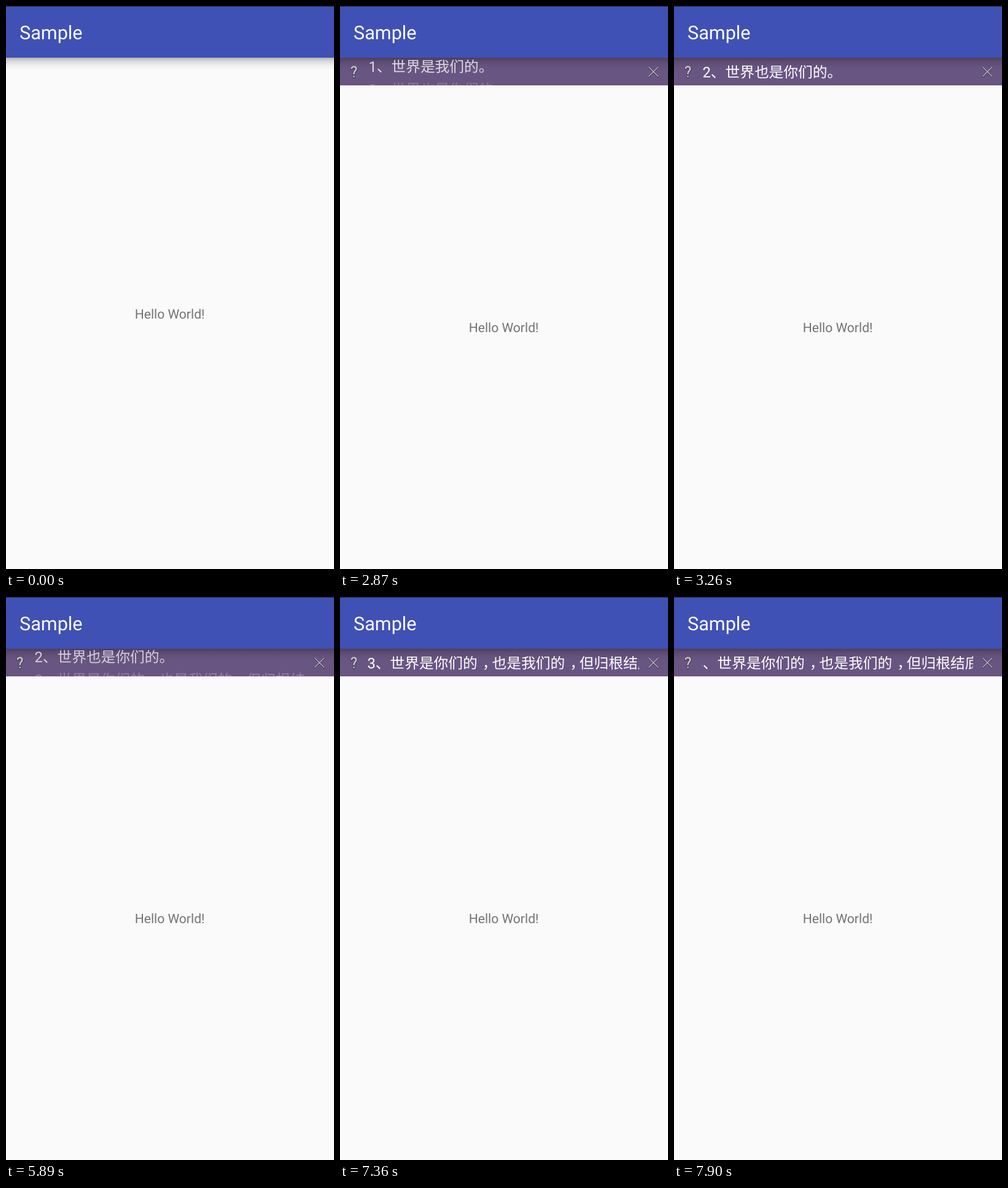
Animation of 534 by 915 pixels, one loop 8 s. Source, as an HTML page:

```html
<!DOCTYPE html>
<html lang="zh-CN">
<head>
<meta charset="utf-8">
<title>Sample</title>
<style>
  html, body { margin: 0; width: 100%; height: 100%; overflow: hidden; background: #fafafa; }
  svg { display: block; width: 100vw; height: 100vh; }
  text { font-family: Roboto, "Noto Sans CJK SC", "Noto Sans CJK", sans-serif; text-rendering: geometricPrecision; white-space: pre; }
  .title { font-size: 30.6px; fill: #fff; }
  .hello { font-size: 21.1px; fill: #737373; text-anchor: middle; }
  .line { font-size: 23.73px; fill: #fff; }
  .icon { fill: none; stroke-linecap: round; stroke-linejoin: round; }
</style>
</head>
<body>
<svg viewBox="0 0 534 915" preserveAspectRatio="none">
  <defs>
    <linearGradient id="shade" x1="0" y1="0" x2="0" y2="1">
      <stop offset="0" stop-color="#000" stop-opacity=".27"/>
      <stop offset=".3" stop-color="#000" stop-opacity=".13"/>
      <stop offset=".65" stop-color="#000" stop-opacity=".04"/>
      <stop offset="1" stop-color="#000" stop-opacity="0"/>
    </linearGradient>
    <clipPath id="view"><rect x="45.3" y="84" width="441.7" height="45"/></clipPath>
    <path id="ask" d="M18.9 101.2C19.6 97.7 26.3 97.6 26.3 101.9C26.3 105.6 22.6 105.6 22.6 110M22.6 114.6V114.7"/>
    <path id="cross" d="M502.8 99.3L517.8 114.3M517.8 99.3L502.8 114.3"/>
  </defs>

  <rect width="534" height="915" fill="#fafafa"/>
  <text id="hello" class="hello" x="266.6" y="508">Hello World!</text>

  <g id="bar">
    <rect y="84" width="534" height="45" fill="#695582"/>
    <g class="icon">
      <use href="#ask" y=".5" stroke="#40364f" stroke-width="4.6"/>
      <use href="#ask" stroke="#c6c1ca" stroke-width="2.7"/>
      <use href="#cross" y=".3" stroke="#463a58" stroke-width="3"/>
      <use href="#cross" stroke="#bdb6c4" stroke-width="1.4"/>
    </g>
  </g>
  <rect y="84" width="534" height="20" fill="url(#shade)"/>
  <g id="lines" clip-path="url(#view)">
    <text class="line" x="46.4" y="115.5">1、世界是我们的。</text>
    <text class="line" x="46.4" y="115.5">2、世界也是你们的。</text>
    <text class="line" x="46.4" y="115.5">3、世界是你们的<tspan dx="8">，</tspan><tspan dx="-8">也</tspan>是我们的<tspan dx="8">，</tspan><tspan dx="-8">但</tspan>归根结底是你们的。</text>
  </g>

  <rect width="534" height="84" fill="#4051b5"/>
  <rect width="534" height="1" fill="#1f2440"/>
  <text class="title" x="22" y="54.3">Sample</text>
</svg>
<script>
  const LOOP = 8000, OPEN = 500, ROW = 37;
  // time in ms, current line, sideways scroll in px
  const steps = [
    [0, 0, 0],
    [2870, .22, 0], [2990, .46, 0], [3140, .76, 0], [3260, 1, 0],
    [5890, 1.27, 0], [6040, 1.57, 0], [6190, 1.87, 0], [6340, 2, 0],
    [7360, 2, 2], [7480, 2, 4.5], [7630, 2, 7.5], [7780, 2, 10.5], [7900, 2, 13]
  ];
  const byId = id => document.getElementById(id);
  const hello = byId('hello'), bar = byId('bar'), group = byId('lines');
  const lines = [...group.children];

  function draw(t) {
    const open = t >= OPEN;
    const [, pos, scroll] = steps.filter(s => s[0] <= t).pop();
    hello.setAttribute('y', open ? 530.3 : 508);
    bar.style.display = group.style.display = open ? '' : 'none';
    lines.forEach((line, i) => {
      const d = i - pos;
      line.setAttribute('transform', `translate(${i === 2 ? -scroll : 0} ${d * ROW})`);
      line.setAttribute('opacity', Math.max(0, 1 - Math.abs(d)));
    });
  }

  const start = performance.now();
  function tick(now) {
    draw(Math.max(0, now - start) % LOOP);
    requestAnimationFrame(tick);
  }
  draw(0);
  requestAnimationFrame(tick);
</script>
</body>
</html>
```
